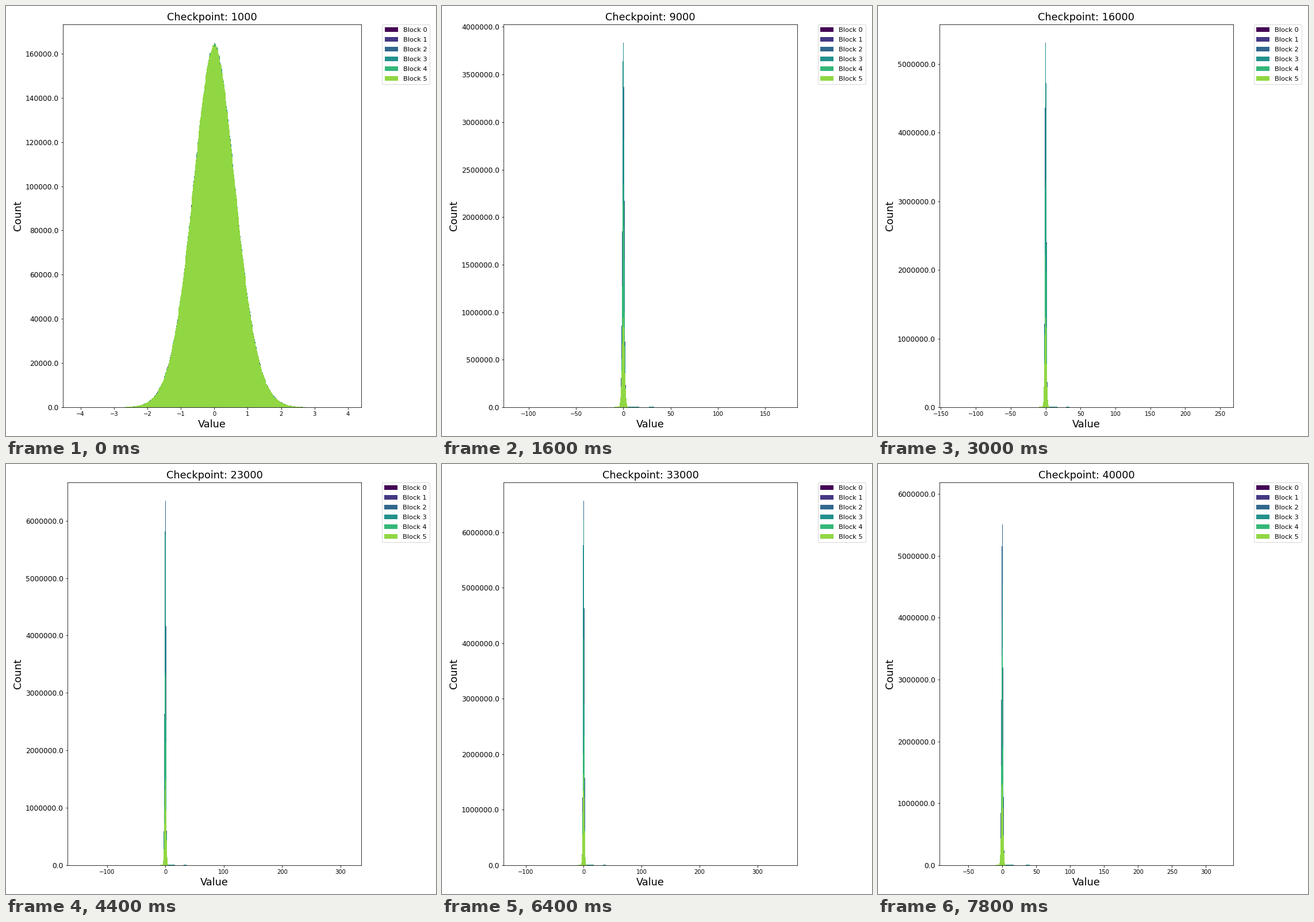
These frames come from a looping animation (748 px wide and 748 px high, 8000 ms). A matplotlib script:

```python
import numpy as np
import matplotlib.pyplot as plt
from matplotlib.animation import FuncAnimation
from matplotlib.patches import Patch
from matplotlib.ticker import FormatStrFormatter

SIZE = 748
FRAMES = 40
BINS = 512
SAMPLES = 2 ** 24
RIGHT, TOP, BOTTOM = 618, 32, 698

# Value range and tallest count at a few checkpoints, interpolated between.
KEYS = [0, 8, 15, 22, 26, 32, 39]
LOW = [-4.12, -112.5, -132.9, -144.6, -128.1, -115.2, -72.6]
HIGH = [3.99, 169.8, 249.9, 312.6, 307.3, 345.5, 320.6]
PEAK = [165e3, 3.835e6, 5.31e6, 6.35e6, 5.86e6, 6.57e6, 5.89e6]

SPAN = [.4, .98, .98, 1, .62, .34]          # share of the full value range
HALF_WIDTH = [1.1, 1.1, 1.1, 1.1, 1.15, 1.6]
COLORS = [plt.cm.viridis(i / 6) for i in range(6)]


def histogram(block, low, high, grown, rng):
    """Bin edges and counts of a bell-shaped sample."""
    span = 1 + (SPAN[block] - 1) * (grown if block == 5 else 1)
    width = span * (high - low) / BINS
    # Even blocks sit half a bin beside the odd ones.
    shift = 0 if block % 2 else grown * width / 2
    edges = low * span + shift + width * np.arange(BINS + 1)

    half = .75 + (HALF_WIDTH[block] - .75) * grown
    sub = (np.arange(8) + .5) / 8 * width
    x = edges[:-1, None] + sub - .05 * grown
    shape = (.5 ** (np.abs(x) / half) ** 1.86).mean(axis=1)
    counts = SAMPLES * shape / shape.sum()
    counts += 1.6 * np.sqrt(counts) * rng.standard_normal(BINS)
    return edges, np.clip(counts, 0, None)


def add_strip(edges, counts, start, end, height):
    mid = (edges[:-1] + edges[1:]) / 2
    inside = (mid > start) & (mid < end)
    counts[inside] = np.maximum(counts[inside], height)


def from_top(y):
    return 1 - y / SIZE


fig = plt.figure(figsize=(SIZE / 72, SIZE / 72), dpi=72, facecolor="white")
ax = fig.add_axes([0, 0, 1, 1])
ax.tick_params(axis="y", labelsize=12.25)
ax.tick_params(axis="x", labelsize=10)
ax.yaxis.set_major_formatter(FormatStrFormatter("%.1f"))

stairs = [ax.stairs(np.zeros(BINS), np.arange(BINS + 1), fill=True,
                    color=c, lw=0, snap=True) for c in COLORS]

label = dict(fontsize=17.75, ha="center", va="baseline")
title = ax.set_title("", fontsize=17.75, pad=7)
x_label = fig.text(.5, from_top(733), "Value", **label)
fig.text(26.3 / SIZE, from_top((TOP + BOTTOM) / 2), "Count",
         rotation=90, rotation_mode="anchor", **label)
ax.legend(handles=[Patch(color=c, lw=0, label=f"Block {i}")
                   for i, c in enumerate(COLORS)],
          loc="upper left", bbox_to_anchor=(1.07, 1), borderaxespad=0,
          fontsize=11.4, labelspacing=.62)


def update(frame):
    rng = np.random.default_rng(frame)
    k = 8 * (frame / 8) ** .7 if frame < 8 else frame
    grown = min(k / 8, 1)
    low, high, peak = (np.interp(k, KEYS, row) for row in (LOW, HIGH, PEAK))

    hists = [histogram(b, low, high, grown, rng) for b in range(6)]
    scale = peak / max(counts.max() for _, counts in hists)
    strip = .0013 * peak / scale
    island = 20 + 2.4 * np.sqrt(k)
    add_strip(*hists[3], 0, 17 * grown, strip)
    add_strip(*hists[3], island, island + 5.5, strip)
    add_strip(*hists[5], -9.5 * grown, 0, strip)
    for patch, (edges, counts) in zip(stairs, hists):
        patch.set_data(counts * scale, edges)

    pad = .05 * (high - low)
    ax.set_xlim(low - pad, high + pad)
    ax.set_ylim(0, 1.05 * peak)

    # Seven-digit tick labels push the axes to the right.
    left = 107 if 1.05 * peak >= 1e6 else 99
    ax.set_position([left / SIZE, from_top(BOTTOM),
                     (RIGHT - left) / SIZE, (BOTTOM - TOP) / SIZE])
    x_label.set_x((left + RIGHT) / 2 / SIZE)
    title.set_text(f"Checkpoint: {1000 * (frame + 1)}")
    return stairs


anim = FuncAnimation(fig, update, frames=FRAMES, interval=200,
                     repeat=True, repeat_delay=0, blit=False)
plt.show()
```
